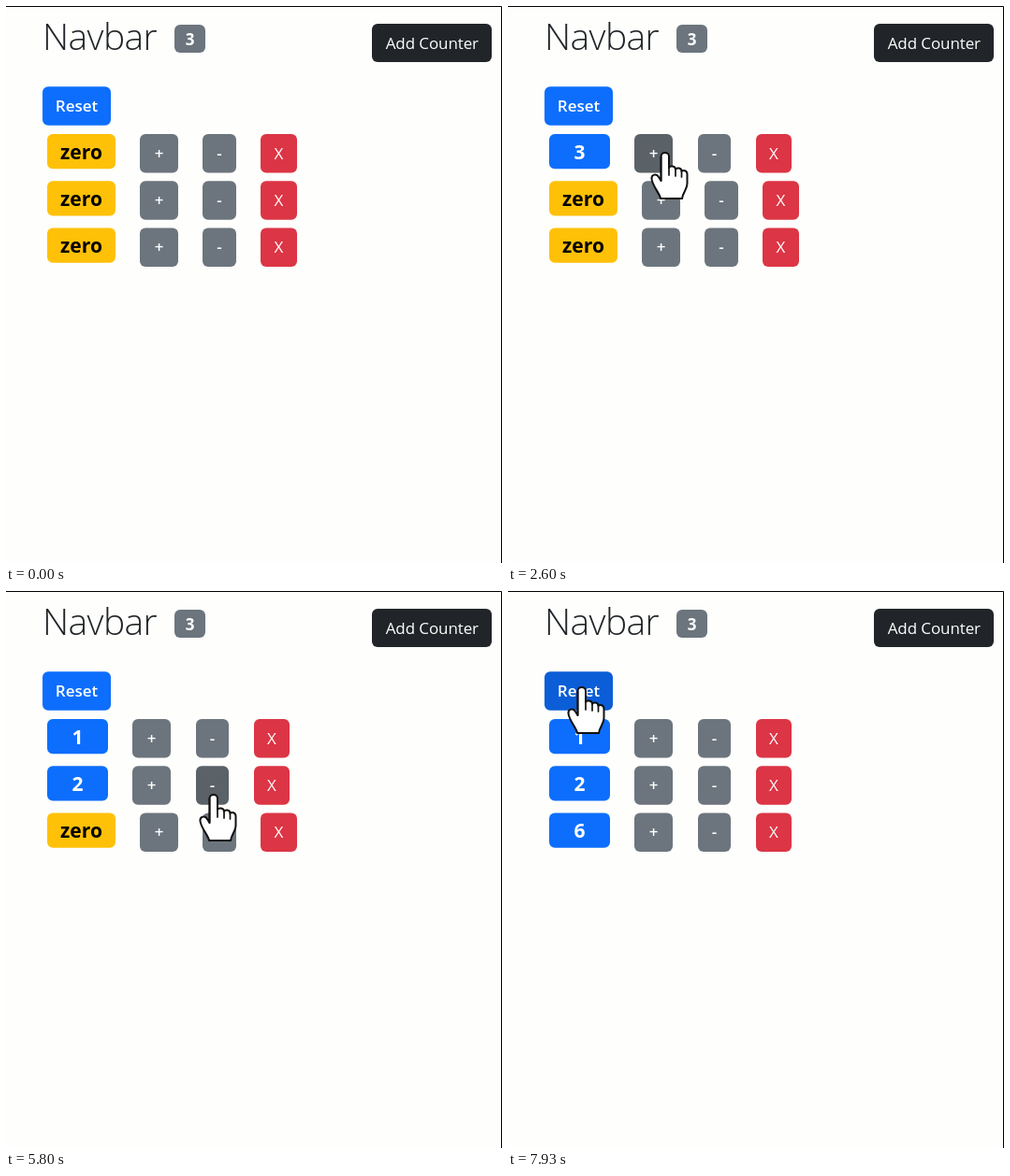
An HTML page for the animation above (8 s loop, 530 px wide and 596 px high).

```html
<!DOCTYPE html>
<html lang="en">
<head>
<meta charset="utf-8">
<title>Counters</title>
<style>
html, body { margin: 0; width: 100%; height: 100%; overflow: hidden; background: #fefefc; }
svg { display: block; width: 530px; height: 596px; font-family: "Open Sans", "Noto Sans", sans-serif; }
text { fill: #fff; text-anchor: middle; font-size: 17px; }
.title { fill: #212529; font-size: 39px; font-weight: 300; text-anchor: start; letter-spacing: -.6px; }
.bold { font-weight: 600; }
.badge { font-weight: 700; font-size: 21px; }
.cursor path { fill: #fff; stroke: #111; stroke-width: 2; stroke-linejoin: round; stroke-linecap: round; }
.cursor .line { fill: none; stroke-width: 1.7; }
</style>
</head>
<body>
<svg id="stage" viewBox="0 0 530 596">
  <path d="M0 .5H529.5V596" fill="none" stroke="#000"/>
  <text class="title" x="39" y="47">Navbar</text>
  <rect x="180" y="20" width="33" height="30" rx="6" fill="#6c757d"/>
  <text class="bold" x="196.5" y="42" style="font-weight:700">3</text>
  <rect x="391" y="19" width="128" height="41" rx="6" fill="#212529"/>
  <text x="455.3" y="46" style="letter-spacing:-.1px">Add Counter</text>
  <g id="ui"></g>
  <g id="arrow" class="cursor">
    <path d="M1 1V33L8.5 26.5L13.5 39L19.5 36.5L14.3 24.3H24.5Z"/>
  </g>
  <g id="hand" class="cursor">
    <path d="M-4.5 5C-4.5 -.5 4 -.5 4 5V17C5 14.5 11 15 11 19C12 16.5 17.5 17 17.5 21C19 19 23.5 20 23.5 24V34C23.5 40 19 43 18 50H-5C-5 46 -14 36 -14.5 29C-15 24 -9 23 -7 27L-4.5 31Z"/>
    <path class="line" d="M-4.5 5V31M4 17V25M11 19V26M17.5 21V27"/>
  </g>
</svg>
<script>
const LOOP = 8000, ENTER = 360, FADE = 150, SAMPLES = 10;
const GRAY = [108, 117, 125], GRAY_HOVER = [90, 97, 103];
const BLUE = [13, 110, 253], BLUE_HOVER = [11, 94, 215];
const RED = [220, 53, 69], RED_HOVER = [187, 45, 59];

// pointer stops: time, x, y
const stops = [
  [360, 14, 29], [700, 268, 118], [1130, 168, 156], [2600, 168, 156],
  [2860, 213, 162], [3530, 213, 162], [3660, 196, 176], [3900, 172, 207],
  [4900, 172, 207], [5140, 217, 213], [5700, 217, 213], [5790, 222, 217],
  [5820, 222, 217], [5990, 249, 238], [6030, 249, 238], [6290, 168, 261],
  [7300, 168, 261], [7730, 114, 119], [7760, 114, 119], [7920, 79, 102]
];

// per row: times of plus and minus clicks
const clicks = [
  { plus: [1380, 1860, 2080], minus: [2980, 3230] },
  { plus: [4160, 4320, 4480, 4640, 4800], minus: [5330, 5500, 5670] },
  { plus: [6340, 6470, 6600, 6720, 6990, 7160], minus: [] }
];

const ui = document.getElementById("ui");
const arrow = document.getElementById("arrow");
const hand = document.getElementById("hand");

function add(tag, attrs) {
  const el = document.createElementNS("http://www.w3.org/2000/svg", tag);
  for (const key in attrs) el.setAttribute(key, attrs[key]);
  return ui.appendChild(el);
}

function makeBox(label, y, height, baseline, cls) {
  const rect = add("rect", { y, height, rx: 6 });
  const text = add("text", { y: y + baseline, class: cls });
  text.textContent = label;
  return { rect, text, y, height };
}

function place(box, x, width) {
  box.x = x;
  box.width = width;
  box.rect.setAttribute("x", x);
  box.rect.setAttribute("width", width);
  box.text.setAttribute("x", x + width / 2);
}

function makeButton(label, y, cls, color, hover) {
  return Object.assign(makeBox(label, y, 41.5, 27, cls), { color, hover });
}

const reset = makeButton("Reset", 86.3, "bold", BLUE, BLUE_HOVER);
place(reset, 39, 73);

const rows = clicks.map((log, i) => {
  const y = 137 + i * 50.2;
  return {
    log,
    badge: makeBox("zero", y, 37.3, 27, "badge"),
    plus: makeButton("+", y, "bold", GRAY, GRAY_HOVER),
    minus: makeButton("-", y, "bold", GRAY, GRAY_HOVER),
    remove: makeButton("X", y, "", RED, RED_HOVER)
  };
});
const buttons = [reset, ...rows.flatMap(r => [r.plus, r.minus, r.remove])];

function pointer(t) {
  if (t < ENTER) return null;
  const i = stops.findIndex(s => s[0] > t);
  if (i < 0) return stops[stops.length - 1].slice(1);
  const [t0, x0, y0] = stops[i - 1], [t1, x1, y1] = stops[i];
  const u = (t - t0) / (t1 - t0), k = u * u * (3 - 2 * u);
  return [x0 + (x1 - x0) * k, y0 + (y1 - y0) * k];
}

function inside(b, p) {
  return p && p[0] >= b.x && p[0] <= b.x + b.width && p[1] >= b.y && p[1] <= b.y + b.height;
}

// share of the last FADE ms spent over the button
function hoverShare(b, t) {
  let n = 0;
  for (let i = 0; i < SAMPLES; i++) if (inside(b, pointer(t - i * FADE / SAMPLES))) n++;
  return n / SAMPLES;
}

// short darker pulse around each click
function press(times, t) {
  return Math.max(0, ...times.map(c => 1 - Math.abs(t - c) / 90));
}

function layout(row, t) {
  const past = times => times.filter(c => c <= t).length;
  const value = past(row.log.plus) - past(row.log.minus);
  const zero = value === 0;
  row.badge.text.textContent = zero ? "zero" : value;
  row.badge.text.style.fill = zero ? "#000" : "#fff";
  row.badge.rect.setAttribute("fill", zero ? "#ffc107" : "#0d6efd");
  place(row.badge, 44, zero ? 73 : 65);
  place(row.plus, zero ? 143 : 135, 41);
  place(row.minus, zero ? 210 : 203, zero ? 36 : 35);
  place(row.remove, zero ? 272 : 265, zero ? 39 : 38);
  row.plus.press = press(row.log.plus, t);
  row.minus.press = press(row.log.minus, t);
}

function showCursor(el, p, on) {
  el.setAttribute("visibility", on ? "visible" : "hidden");
  if (on) el.setAttribute("transform", `translate(${p[0].toFixed(1)} ${p[1].toFixed(1)})`);
}

function draw(t) {
  rows.forEach(row => layout(row, t));
  for (const b of buttons) {
    const k = hoverShare(b, t) + 0.3 * (b.press || 0);
    const mix = b.color.map((c, i) => Math.round(c + (b.hover[i] - c) * k));
    b.rect.setAttribute("fill", `rgb(${mix})`);
  }
  const p = pointer(t);
  const over = buttons.some(b => inside(b, p));
  showCursor(hand, p, p && over);
  showCursor(arrow, p, p && !over);
}

const start = performance.now();
function tick() {
  draw((performance.now() - start) % LOOP);
  requestAnimationFrame(tick);
}
tick();
</script>
</body>
</html>
```
